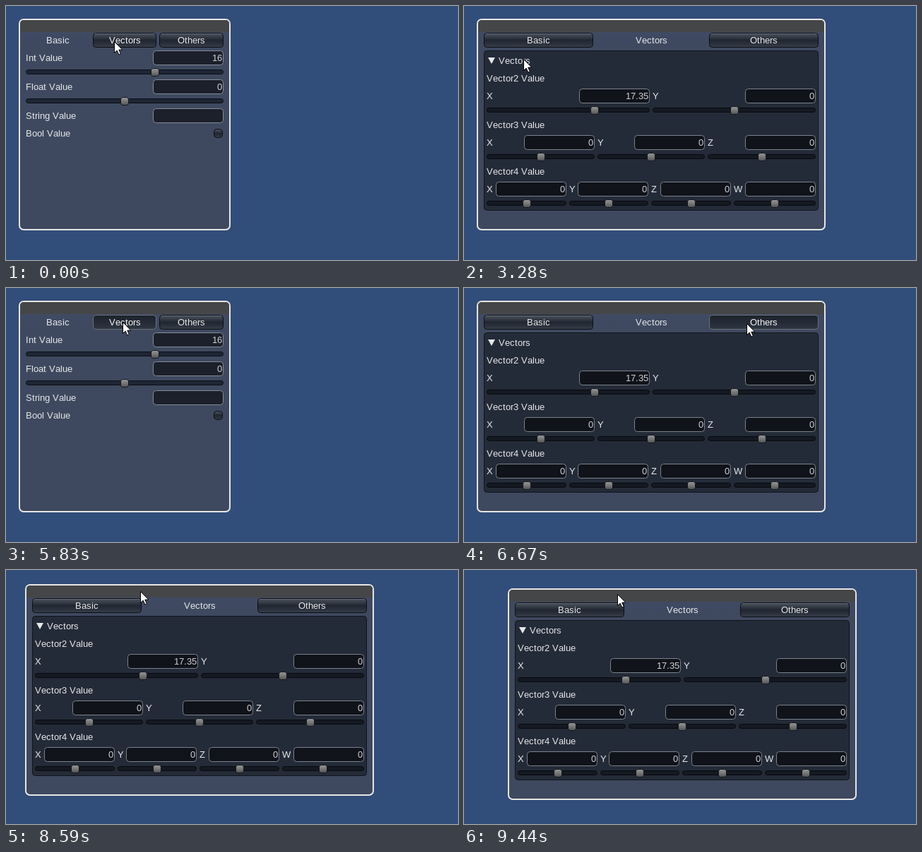
Animation of 640x360 px, one loop 9550 ms. Source, as an HTML page with a canvas:

```html
<!DOCTYPE html>
<html lang="en">
<head>
<meta charset="utf-8">
<title>GUI window</title>
<style>
html, body { margin: 0; width: 100%; height: 100%; overflow: hidden; background: #314d79; }
canvas { display: block; }
</style>
</head>
<body>
<canvas id="stage" width="640" height="360"></canvas>
<script>
const ctx = document.getElementById('stage').getContext('2d');
const LOOP = 9550, END = 9430, TICK = 60, PRESS = 120;
const INK = '#e6e7e9', BORDER = '#0b0e14';
const TABS = ['Basic', 'Vectors', 'Others'];
const HOME = { x: 153, y: 50 }, GRIP = { x: 179, y: 27 };

// The session: pointer moves and clicks, in order
const moves = [], clicks = [];
const move = (from, to, x, y) => moves.push({ from, to, x, y });
const click = (at, name) => clicks.push({ at, name });

click(430, 'Vectors');
move(450, 900, 262, 47);
click(1080, 'Others');
click(1360, 'Vectors');
move(1360, 1810, 92, 39);
click(2120, 'Basic');
move(2130, 2380, HOME.x, HOME.y);
click(2710, 'Vectors');
move(2710, 3100, 84, 75);
click(3280, 'fold');
click(3960, 'fold');
click(4490, 'fold');
move(4640, 4730, 88, 100);
move(4730, 4890, 92, 48);
click(5230, 'Basic');
move(5590, 5690, 165, 48);
click(5950, 'Vectors');
move(6260, 6520, 400, 50);
click(6730, 'Others');
move(6740, 7120, 278, 43);
click(7520, 'Vectors');
move(7670, 7800, GRIP.x, GRIP.y);

// Drag the title bar to and fro
const dragFrom = 7850;
move(dragFrom, 8215, 251, 33);
move(8220, 8530, 188, 29.4);
move(8530, 9070, 267, 37);
move(9163, END, 217, 34.4);

function pointer(t) {
  let { x, y } = HOME;
  for (const m of moves) {
    if (t < m.from) break;
    const k = Math.min(1, (t - m.from) / (m.to - m.from));
    const e = (1 - Math.cos(Math.PI * k)) / 2;
    x += (m.x - x) * e;
    y += (m.y - y) * e;
  }
  return { x: Math.round(x), y: Math.round(y) };
}

function stateAt(t) {
  let tab = 0, open = false;
  for (const { at, name } of clicks) {
    if (at > t) break;
    if (name === 'fold') open = !open;
    else tab = TABS.indexOf(name);
  }
  const pressed = clicks.some(c => t >= c.at - PRESS && t < c.at);
  return { tab, open, pressed };
}

function gradient(y, h, colors) {
  const g = ctx.createLinearGradient(0, y, 0, y + h);
  colors.forEach((c, i) => g.addColorStop(i / (colors.length - 1), c));
  return g;
}

function box(x, y, w, h, r, fill, stroke, line = 1) {
  ctx.beginPath();
  ctx.roundRect(x + line / 2, y + line / 2, w - line, h - line, r);
  ctx.fillStyle = fill;
  ctx.fill();
  ctx.strokeStyle = stroke;
  ctx.lineWidth = line;
  ctx.stroke();
}

// Glyphs advance by whole pixels; align is 0 (left) to 1 (right)
function text(s, x, mid, align = 0, color = INK) {
  ctx.font = '13px "Liberation Sans", Arial, sans-serif';
  ctx.fillStyle = color;
  const widths = [...s].map(c => Math.round(ctx.measureText(c).width));
  let left = Math.round(x - align * widths.reduce((a, b) => a + b, 0));
  [...s].forEach((c, i) => {
    ctx.fillText(c, left, mid + 5);
    left += widths[i];
  });
}

function polygon(pts, fill) {
  ctx.beginPath();
  pts.forEach(([x, y]) => ctx.lineTo(x, y));
  ctx.closePath();
  ctx.fillStyle = fill;
  ctx.fill();
}

function field(right, mid, value, dark) {
  box(right - 100, mid - 10, 100, 21, 4, dark ? '#10131a' : '#1b202a', dark ? '#7c828b' : '#858c98');
  text(value, right - 2, mid, 1, '#cfd1d4');
}

function slider(x, right, mid, value, dark) {
  box(x, mid - 3, right - x, 7, 3, dark ? '#141922' : '#1d2635', dark ? '#07090d' : BORDER);
  const c = Math.round((x + right) / 2 + value * (right - x - 12) / 100);
  box(c - 6, mid - 5, 12, 12, 3, gradient(mid - 5, 12, ['#9a9a9a', '#777777', '#4e4e4e']), '#11141a');
}

const raised = (y, h) => gradient(y, h, ['#4e545e', '#3a404b', '#212731', '#2b313c', '#39404b']);

function button(x, w, label, selected, hover, pressed) {
  const y = 38, h = 21;
  if (selected && hover) {
    box(x, y, w, h, 4, gradient(y, h, ['#747a83', '#4a505b', '#424956', '#4b5260']), '#5b626e');
  } else if (hover && pressed) {
    box(x, y, w, h, 4, gradient(y, h, ['#1c212b', '#252b36', '#303743']), '#6c727c');
  } else if (!selected) {
    box(x, y, w, h, 4, raised(y, h), BORDER);
    ctx.fillStyle = '#676d76';
    ctx.fillRect(x + 3, y + 1, w - 6, 1);
  }
  text(label, x + w / 2, 48, 0.5, hover ? '#f4f4f4' : INK);
}

function vectorRows(x, right, y, label, names, dark, first = 0) {
  const n = names.length, w = right - x;
  const step = n === 4 ? (w + 0.4) / 4 : (w + 4) / n;
  text(label, x, y);
  [...names].forEach((name, i) => {
    const left = Math.round(x + i * step);
    const end = i === n - 1 ? right : Math.round(x + (i + 1) * step - 4);
    const value = i ? 0 : first;
    text(name, left, y + 25);
    field(end, y + 25, String(value), dark);
    slider(left, end, y + 45, value, dark);
  });
}

function basicPage() {
  text('Int Value', 28, 73);
  field(308, 73, '16');
  slider(28, 308, 93, 16);
  text('Float Value', 28, 114);
  field(308, 114, '0');
  slider(28, 308, 134, 0);
  text('String Value', 28, 155);
  field(308, 155, '');
  text('Bool Value', 28, 180);
  box(294, 174, 13, 13, 4, raised(174, 13), BORDER);
}

function vectorsPage(open) {
  if (!open) {
    polygon([[30, 69], [39.5, 73.5], [30, 78]], INK);
    text('Vectors', 45, 73);
    return;
  }
  box(28, 63, 474, 227, 4, '#242b38', '#0f131a');
  polygon([[34, 73], [44, 73], [39, 82]], INK);
  text('Vectors', 49, 77);
  vectorRows(32, 498, 102, 'Vector2 Value', 'XY', true, 17.35);
  vectorRows(32, 498, 168, 'Vector3 Value', 'XYZ', true);
  vectorRows(32, 498, 234, 'Vector4 Value', 'XYZW', true);
}

function othersPage() {
  vectorRows(28, 527, 73, 'Color Value', 'RGBA');
  vectorRows(28, 527, 139, 'Rect Value', 'XYWH');
}

function panel({ tab, open, pressed }, at) {
  const w = tab === 2 ? 519 : tab === 1 && open ? 494 : 300;
  box(18, 18, w, 300, 6, '#3e495f', '#e6e6e2', 2);
  ctx.fillStyle = '#454648';
  ctx.beginPath();
  ctx.roundRect(20, 20, w - 4, 17, [5, 5, 0, 0]);
  ctx.fill();
  ctx.fillStyle = gradient(37, 25, ['#3f4a63', '#3e495f']);
  ctx.fillRect(20, 37, w - 4, 25);

  const bw = (w - 28) / 3;
  TABS.forEach((label, i) => {
    const x = Math.round(28 + i * (bw + 4));
    const end = Math.round(28 + i * (bw + 4) + bw);
    const hover = at.x >= x && at.x < end && at.y >= 38 && at.y < 59;
    button(x, end - x, label, tab === i, hover, pressed);
  });
  if (tab === 0) basicPage();
  else if (tab === 1) vectorsPage(open);
  else othersPage();
}

function arrow({ x, y }) {
  ctx.save();
  ctx.translate(x + 0.5, y + 0.5);
  polygon([[0, 0], [0, 16], [3.7, 12.6], [6.3, 18.5], [8.8, 17.4], [6.3, 11.6], [11.3, 11.6]], '#fff');
  ctx.strokeStyle = '#000';
  ctx.lineWidth = 1;
  ctx.stroke();
  ctx.restore();
}

function draw(time) {
  // The pointer moves in ticks; the window follows one tick late
  const t = Math.min(END, Math.floor((time - 10) / TICK) * TICK + 10);
  const before = pointer(t - TICK);
  const dragging = t - TICK >= dragFrom;
  const dx = dragging ? before.x - GRIP.x : 0;
  const dy = dragging ? before.y - GRIP.y : 0;
  ctx.fillStyle = '#314d79';
  ctx.fillRect(0, 0, 640, 360);
  ctx.save();
  ctx.translate(dx, dy);
  panel(stateAt(time), { x: before.x - dx, y: before.y - dy });
  ctx.restore();
  arrow(pointer(t));
}

const start = performance.now();
function frame() {
  draw((performance.now() - start) % LOOP);
  requestAnimationFrame(frame);
}
frame();
</script>
</body>
</html>
```
